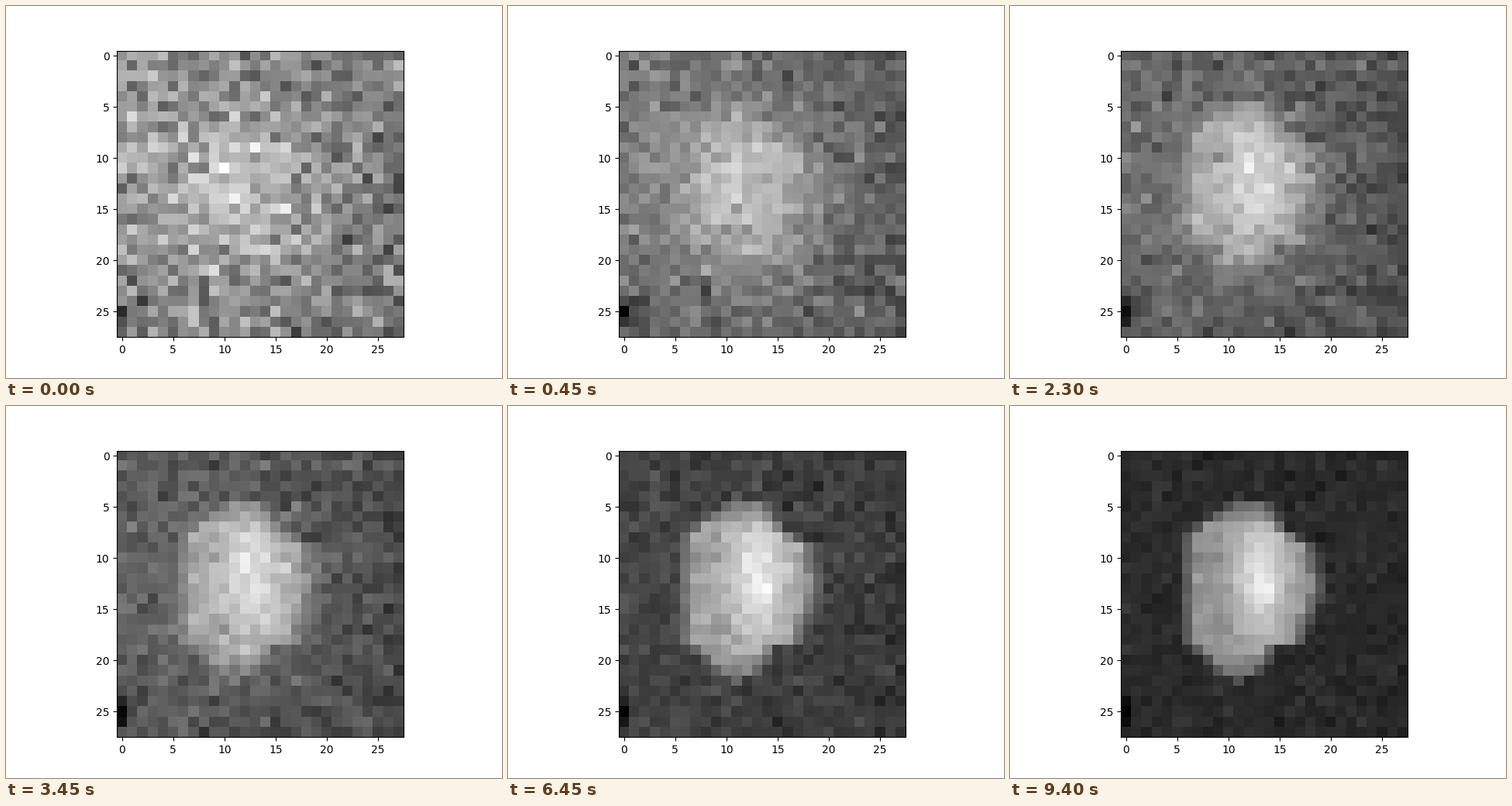
Recreate the animation shown at these times as a matplotlib script. Size 640 by 480 pixels, loop 10000 ms.

```python
import numpy as np
import matplotlib.pyplot as plt
from matplotlib.animation import FuncAnimation

SIZE, FRAMES, STEP = 28, 200, 50
rows, cols = np.mgrid[0:SIZE, 0:SIZE]
rng = np.random.default_rng(12)

# Strongest specks at the start: row, column
BRIGHT = [(15, 16), (9, 13), (11, 10), (1, 27), (6, 1), (21, 9)]
DARK = [(24, 2), (22, 1), (18, 22), (27, 17)]


def bump(row, col, high, wide):
    return np.exp(-((rows - row) / high) ** 2 / 2 - ((cols - col) / wide) ** 2 / 2)


def make_blob():
    """Lit blob: an outline through a few points, soft at its rim."""
    left = np.interp(rows, [4, 7, 8, 18, 21, 22], [11, 7, 6, 6, 9, 11])
    right = np.interp(rows, [4, 5, 7, 9, 13, 18, 19, 21, 22],
                      [11, 14, 15, 18, 19, 17, 14, 13, 11])
    inside = np.minimum(cols - left, right - cols)
    rim = np.clip(0.5 + 0.5 * inside, 0, 1)
    rim[(rows < 4) | (rows > 22)] = 0
    top = np.clip((rows - 3) / 4, 0, 1)
    bottom = np.clip((26 - rows) / 7, 0, 1)
    light = (0.47 + 0.38 * bump(11.5, 13.2, 4.5, 1.9)
             + 0.13 * bump(13.3, 13.4, 0.9, 0.9))
    return light * rim * top * bottom


blob = make_blob()
haze = bump(12.8, 12, 5.5, 5.5)


def grain():
    return np.clip(rng.standard_normal((SIZE, SIZE)), -2, 2)


def make_walk():
    """Noise that drifts quickly at first and then nearly settles."""
    noise = grain()
    for sign, specks in ((1, BRIGHT), (-1, DARK)):
        for cell in specks:
            noise[cell] = 2.5 * sign
    walk = [noise]
    for i in range(FRAMES - 1):
        keep = 0.996 - 0.06 * np.exp(-i / 25)
        noise = keep * noise + np.sqrt(1 - keep ** 2) * grain()
        walk.append(noise)
    return walk


walk = make_walk()


def picture(i):
    t = i * STEP / 1000
    rest = 1 - i / FRAMES
    start = np.exp(-t / 0.08)

    ground = 0.15 + 0.27 * rest + 0.10 * start
    tilt = 0.004 * rest * (13.5 - cols)
    mist = 0.33 * rest ** 2 * (1 - 0.35 * start) * haze
    shape = 0.85 * (1 - rest ** 2) * blob
    reach = 0.4 + 1.8 * rest ** 4
    corner = np.exp(-cols / reach - ((rows - 25) / 1.7) ** 2)
    shade = ground * (1 - 0.5 * start) * corner
    strength = 0.024 + 0.045 * rest + 0.04 * start

    return np.clip(ground + tilt + mist + shape - shade + strength * walk[i], 0, 1)


fig, ax = plt.subplots(figsize=(6.4, 4.8), dpi=100)
image = ax.imshow(picture(0), cmap="gray", vmin=0, vmax=1, interpolation="nearest")


def update(i):
    image.set_data(picture(i))
    return [image]


anim = FuncAnimation(fig, update, frames=FRAMES, interval=STEP,
                     repeat=True, repeat_delay=0)
plt.show()
```
